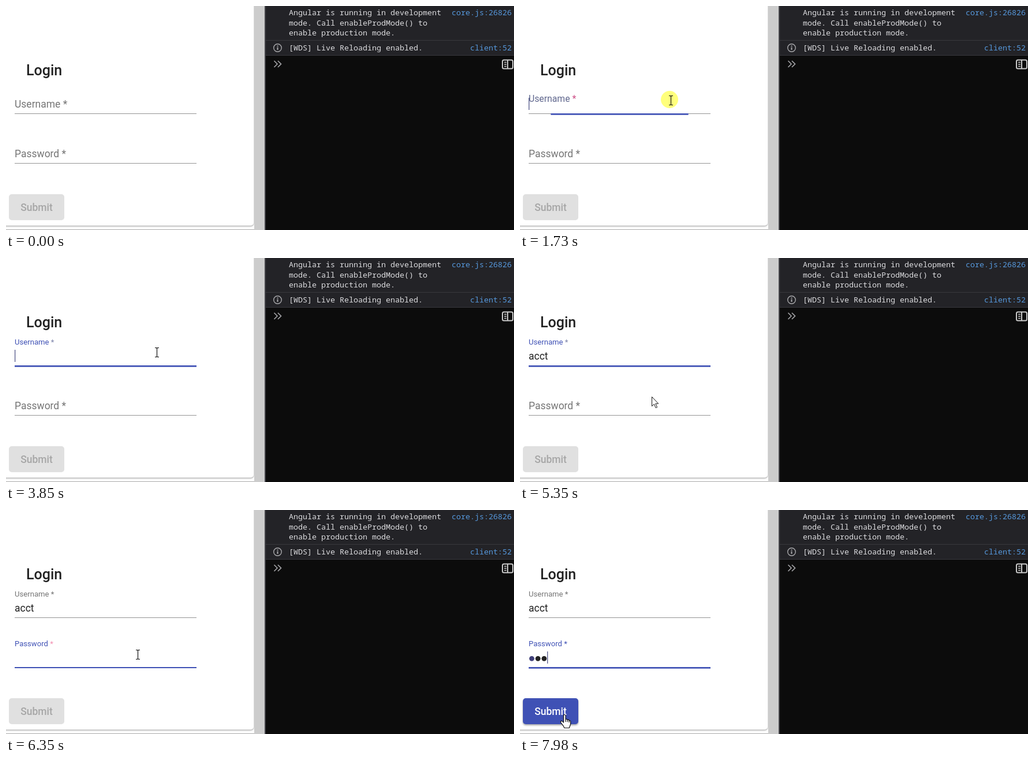
Recreate the animation shown at these times as an HTML page. Size 880 px wide and 388 px high, loop 8000 ms.

```html
<!DOCTYPE html>
<html lang="en">
<head>
<meta charset="utf-8">
<title>Login form</title>
<style>
  html, body { margin: 0; width: 100%; height: 100%; overflow: hidden; background: #fff; }
  svg { display: block; width: 880px; height: 388px; }
  text { white-space: pre; }
  .ui { font-family: Roboto, sans-serif; font-size: 17.5px; }
  .medium { font-weight: 500; }
  .log { font-family: "Noto Sans Mono", "DejaVu Sans Mono", monospace; font-size: 13.33px; fill: #dcdcdf; }
  .log .link { fill: #5698dc; text-anchor: end; }
  .card { filter: drop-shadow(0 1px 1px rgba(0,0,0,.42)); }
</style>
</head>
<body>
<svg viewBox="0 0 880 388">
  <rect width="430" height="388" fill="#fefefe"/>
  <rect class="card" x="-20" y="-20" width="449" height="400.5" rx="5" fill="#fff"/>
  <rect y="387" width="448" height="1" fill="#a9a9a9"/>
  <rect x="430" width="18" height="388" fill="#ccc"/>

  <rect x="448" width="432" height="388" fill="#0c0c0c"/>
  <rect x="450" width="430" height="86" fill="#232327"/>
  <path d="M450 59.5H880M450 85.5H880" stroke="#38383d"/>
  <rect x="448" width="2" height="388" fill="#45454a"/>
  <g class="log">
    <text x="490" y="16">Angular is running in development</text>
    <text x="490" y="34">mode. Call enableProdMode() to</text>
    <text x="490" y="51">enable production mode.</text>
    <text x="490" y="77">[WDS] Live Reloading enabled.</text>
    <text x="876" y="16" class="link">core.js:26826</text>
    <text x="876" y="77" class="link">client:52</text>
  </g>
  <g fill="none" stroke="#a8a8ab" stroke-width="1.4">
    <circle cx="470.5" cy="72.5" r="6.8"/>
    <path d="M470.5 71.5v4.5M470.5 68.4v1.8" stroke-width="2"/>
    <path d="M464.5 95l5.5 5.5-5.5 5.5M471 95l5.5 5.5-5.5 5.5" stroke-width="1.6"/>
  </g>
  <g fill="none" stroke="#c9c9c9" stroke-width="2">
    <rect x="860" y="93.5" width="18" height="15" rx="2.5"/>
    <path d="M869 93v16"/>
    <path d="M863 97.5h4M863 101h4M863 104.5h4" stroke-width="1.3"/>
  </g>

  <g class="ui">
    <text x="35" y="120" class="medium" font-size="25" style="font-size:25px" fill="#212121">Login</text>
    <g id="fields"></g>
    <text id="typed" x="15" y="176" fill="#212121"></text>
    <g id="dots"></g>
    <rect id="button" x="5" y="326" width="96" height="45" rx="5"/>
    <text id="submit" x="53" y="355" text-anchor="middle" class="medium">Submit</text>
  </g>
  <rect id="caret" width="1.2" height="21" fill="#454b80"/>
  <circle id="click" r="15" fill="#ffff7c"/>
  <g id="mouse">
    <path id="arrow" d="M.5.5v16.2l3.8-3.6 2.9 6.5 2.4-1.1-2.8-6.3h4.9z" fill="#fff" stroke="#111" stroke-linejoin="round"/>
    <path id="beam" d="M-3 -7.5h2.5l1 1 1-1H4M.5-6.5v14M-3 8.5h2.5l1-1 1 1H4" fill="none" stroke="#111" stroke-width="1.2"/>
    <path id="hand" d="M-1.5 1.5q0-2 1.7-2t1.8 2v6q2.6-.8 3.1 1 2.4-.7 2.9 1.1 2.6-.4 2.6 2v4.4l-2.3 6.5h-8.5l-1.6-3.4-4.4-5.8q-1-2 .6-2.7 1.3-.4 2.6 1l1.5 1.5zM2 8v4M5.1 9v3.3M8 10v3" fill="#fff" stroke="#111" stroke-width="1.2" stroke-linejoin="round"/>
  </g>
</svg>
<script>
const LOOP = 8000, NAME_FOCUS = 1670, PASS_FOCUS = 5790, ENABLED = 6720;
const NS = 'http://www.w3.org/2000/svg';
const ENTRY = 'acct';
const KEYS = [4000, 4150, 4310, 4470], PASS_KEYS = [6720, 7030, 7120];
const CARET_X = [15, 25, 34, 43, 49];
const CARET_ON = [[1670, 2280], [2750, 3300], [3850, 4980], [5480, 6330], [6720, 7570], [7980, 8000]];
const GREY = [117, 117, 117], BLUE = [63, 81, 181], PINK = [205, 80, 135];
const ROSE = [244, 143, 177], MUTED = [125, 132, 170], OFF = [224, 224, 224];

// Each move: start, end, number of steps, Bezier control points.
const MOVES = [
  [210, 730, 8, [[400, 118], [710, 160], [520, 388], [350, 181]]],
  [980, 1210, 4, [[350, 181], [258, 150]]],
  [1440, 1520, 2, [[258, 150], [261, 163]]],
  [4700, 5020, 5, [[261, 163], [228, 239]]],
  [5350, 5350, 1, [[228, 239], [228, 240]]],
  [5560, 5640, 2, [[228, 240], [228, 250]]],
  [7350, 7980, 9, [[228, 250], [110, 270], [77, 355]]]
];

const $ = id => document.getElementById(id);
const set = (el, attrs) => { for (const k in attrs) el.setAttribute(k, attrs[k]); };
const add = (parent, tag, attrs, text = '') => {
  const el = document.createElementNS(NS, tag);
  set(el, attrs);
  el.textContent = text;
  return parent.appendChild(el);
};
const show = (el, on) => { el.style.display = on ? '' : 'none'; };
const clamp = v => Math.min(1, Math.max(0, v));
const lerp = (a, b, p) => a + (b - a) * p;
const mix = (a, b, p) => `rgb(${a.map((v, i) => Math.round(lerp(v, b[i], p)))})`;
const count = (times, t) => times.filter(k => t >= k).length;

// cubic-bezier(.25, .8, .25, 1)
function ease(x) {
  x = clamp(x);
  let lo = 0, hi = 1, s = x;
  for (let i = 0; i < 20; i++) {
    s = (lo + hi) / 2;
    if (.75 * s * (1 - s) + s ** 3 < x) lo = s; else hi = s;
  }
  return 2.4 * s * (1 - s) ** 2 + 3 * s * s * (1 - s) + s ** 3;
}

function bezier(pts, u) {
  while (pts.length > 1)
    pts = pts.slice(1).map((p, i) => [lerp(pts[i][0], p[0], u), lerp(pts[i][1], p[1], u)]);
  return pts[0];
}

function makeField(name, y) {
  const g = $('fields');
  add(g, 'rect', { x: 15, y: y + 10, width: 315, height: 1, fill: '#949494' });
  const bar = add(g, 'rect', { y: y + 10, fill: '#3f51b5' });
  const label = add(g, 'text', { x: 15 }, name + ' ');
  const star = add(label, 'tspan', {}, '*');
  return { y, bar, label, star };
}

function drawField(f, t, focus, blur, height, starColor) {
  const start = focus + 12;
  const up = ease((t - start) / 400);
  const out = t < blur ? 0 : ease((t - blur) / 300);
  const width = 315 * (.5 + .5 * ease((t - start) / 300));
  const tint = up * (1 - out);
  set(f.bar, { x: 172.5 - width / 2, width, height, opacity: t < start ? 0 : 1 - out });
  set(f.label, { y: lerp(f.y, f.y - 25.8, up), fill: mix(GREY, BLUE, tint) });
  f.label.style.fontSize = lerp(17.5, 13.125, up) + 'px';
  set(f.star, { fill: t < start || out ? mix(GREY, GREY, 0) : mix(starColor, starColor, 0) });
}

function drawMouse(t) {
  const move = MOVES.filter(m => t >= m[0]).pop();
  show($('mouse'), move);
  if (!move) return;
  const [t0, t1, n, pts] = move;
  const step = 1 + Math.floor(clamp((t - t0) / (t1 - t0 || 1)) * (n - 1) + 1e-6);
  const [x, y] = bezier(pts, Math.min(step, n) / n);
  const inField = x < 330 && (y > 152 && y < 188 || y > 243 && y < 274);
  const onButton = x < 101 && y > 326;
  show($('beam'), inField);
  show($('hand'), onButton);
  show($('arrow'), !inField && !onButton);
  set($('mouse'), { transform: `translate(${x} ${y})` });
}

function drawClick(t) {
  const first = t < PASS_FOCUS, age = t - (first ? NAME_FOCUS : PASS_FOCUS);
  show($('click'), age >= 0 && age < 290);
  set($('click'), first ? { cx: 259, cy: 162 } : { cx: 228, cy: 249 });
}

const nameField = makeField('Username', 176), passField = makeField('Password', 262);
const dots = PASS_KEYS.map((_, i) =>
  add($('dots'), 'circle', { cx: 20.4 + i * 10.7, cy: 257.3, r: 4.4, fill: i ? '#222' : '#40407a' }));

function draw(t) {
  drawField(nameField, t, NAME_FOCUS, PASS_FOCUS, 2.7, t < 2130 ? PINK : MUTED);
  drawField(passField, t, PASS_FOCUS, LOOP, t > 6190 && t < ENABLED ? 2 : 2.7, t < ENABLED ? ROSE : BLUE);

  const typed = count(KEYS, t), hidden = count(PASS_KEYS, t);
  $('typed').textContent = ENTRY.slice(0, typed);
  dots.forEach((d, i) => show(d, i < hidden));

  const inPass = t >= PASS_FOCUS;
  show($('caret'), CARET_ON.some(([a, b]) => t >= a && t < b));
  set($('caret'), { x: inPass ? 15 + hidden * 10.7 : CARET_X[typed], y: inPass ? 245 : 159 });

  const on = t >= ENABLED;
  const p = !on ? 0 : t >= 6880 ? 1 : ease((t - 6660) / 400);
  set($('button'), { fill: mix(OFF, BLUE, p) });
  $('button').style.filter = on ? 'drop-shadow(0 2px 1.5px rgba(0,0,0,.35))' : 'none';
  set($('submit'), { fill: on ? '#fff' : '#a6a6a6' });

  drawClick(t);
  drawMouse(t);
}

const begin = performance.now();
function frame() {
  draw((performance.now() - begin) % LOOP);
  requestAnimationFrame(frame);
}
frame();
</script>
</body>
</html>
```
